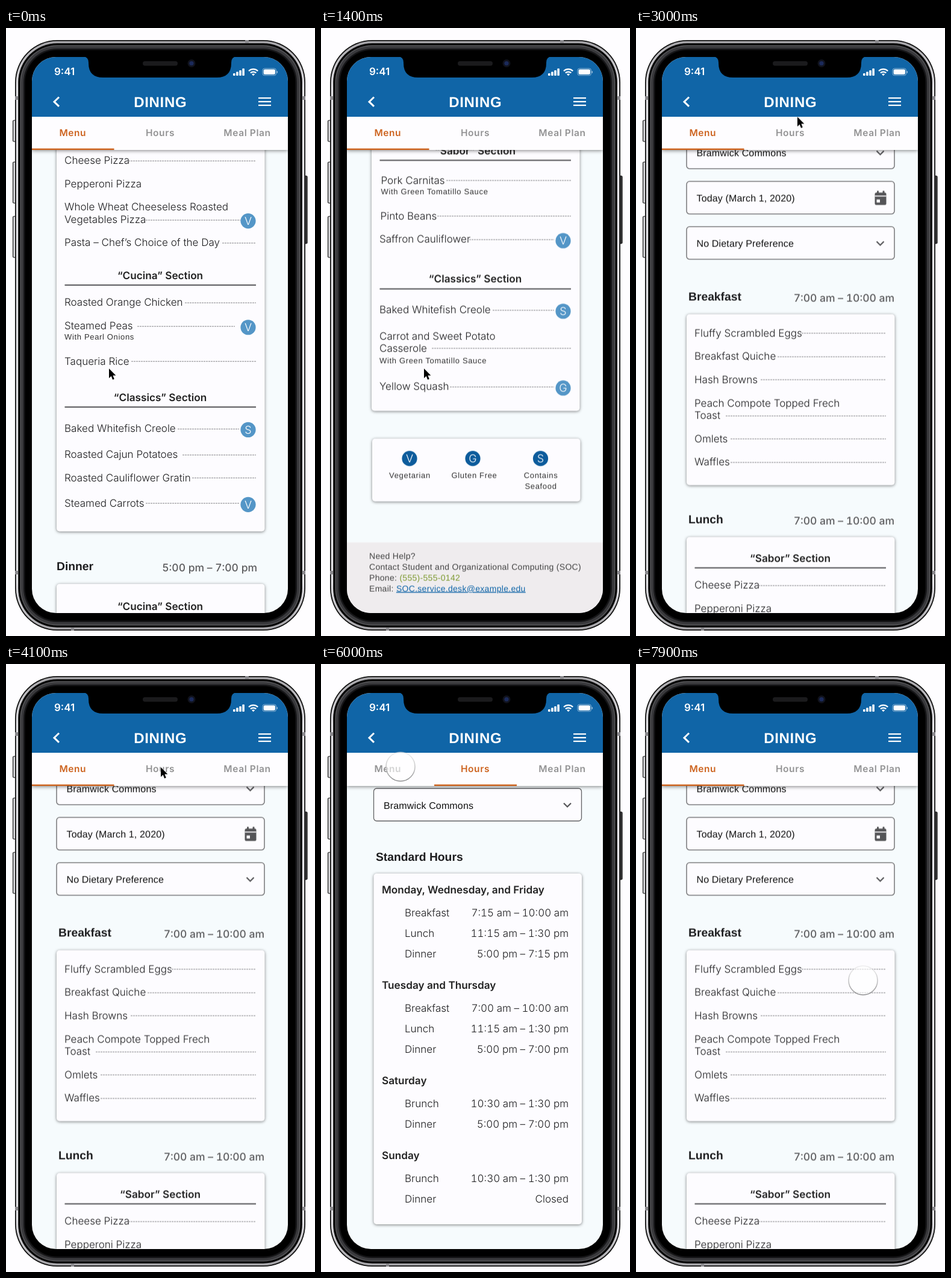
Animation of 513 by 1007 pixels, one loop 8 s. Source, as an HTML page:

```html
<!DOCTYPE html>
<html lang="en">
<head>
<meta charset="utf-8">
<title>Dining menu</title>
<style>
html, body { margin: 0; width: 100%; height: 100%; overflow: hidden; background: #fefdff; }
svg { display: block; width: 513px; height: 1007px; }
text { font-family: Inter, "Open Sans", sans-serif; text-rendering: geometricPrecision; white-space: pre; }
.item { font-weight: 300; font-size: 17.05px; fill: #1d1d1f; }
.sub { font: 13px "Liberation Sans", Arial, sans-serif; letter-spacing: .66px; fill: #333; }
.sec { font-weight: 600; font-size: 17.2px; fill: #222; }
.head { font: bold 19.3px "Liberation Sans", Arial, sans-serif; fill: #1d1d1f; }
.time { font-weight: 500; font-size: 17.5px; fill: #5c5c5e; }
.field { font: 16px "Liberation Sans", Arial, sans-serif; letter-spacing: .15px; fill: #111; }
.foot { font: 14px "Liberation Sans", Arial, sans-serif; letter-spacing: .3px; fill: #444; }
.mark { font-weight: 300; font-size: 18px; fill: #fff; }
.title { font: bold 24px "Liberation Sans", Arial, sans-serif; letter-spacing: .7px; fill: #fff; }
.clock { font-weight: 600; font-size: 17px; fill: #fff; }
.tab { font-weight: 600; font-size: 15.5px; letter-spacing: .6px; fill: #939394; }
.end { text-anchor: end; font-variant-numeric: tabular-nums; }
.mid { text-anchor: middle; }
.card { fill: #fdfcff; filter: drop-shadow(0 1px 2.5px rgba(0,0,0,.5)); }
.box { fill: #fdfcff; stroke: #626264; stroke-width: 1.3; }
.lead { stroke: #858587; stroke-dasharray: 3 1; }
.rule { stroke: #555558; stroke-width: 2; }
.icon { fill: none; stroke: #555558; stroke-width: 2.2; }

.anim { animation: 8s linear infinite; }
#menuX { animation-name: menuX; }
#menuY { animation-name: menuY; }
#hoursX { animation-name: hoursX; }
#hoursY { animation-name: hoursY; }
#menuTab { animation-name: menuTab; }
#hoursTab { animation-name: hoursTab; }
#menuBar { animation-name: menuBar; transform-origin: 43px 0; }
#hoursBar { animation-name: hoursBar; transform-origin: 188px 0; }
#arrow { animation-name: arrow, early; }
#touch { animation-name: touch, late; }

@keyframes menuY {
  0% { transform: translateY(-702px); animation-timing-function: cubic-bezier(.3,.4,.5,1); }
  12%, 21.25% { transform: translateY(-1661px); animation-timing-function: cubic-bezier(.4,0,.7,.75); }
  31.25% { transform: translateY(-508px); animation-timing-function: cubic-bezier(.3,.35,.5,1); }
  36.5%, 100% { transform: translateY(0); }
}
@keyframes menuX {
  0%, 56.72% { transform: translateX(0); animation-timing-function: ease-out; }
  62.97%, 78.1% { transform: translateX(-425px); animation-timing-function: ease-out; }
  84.35%, 100% { transform: translateX(0); }
}
@keyframes hoursX {
  0%, 56.72% { transform: translateX(425px); animation-timing-function: ease-out; }
  62.97%, 78.1% { transform: translateX(0); animation-timing-function: ease-out; }
  84.35%, 100% { transform: translateX(425px); }
}
@keyframes hoursY {
  0%, 65% { transform: translateY(-27px); animation-timing-function: ease-in-out; }
  70%, 100% { transform: translateY(0); }
}
@keyframes menuTab {
  0%, 56.72% { fill: #cd6420; animation-timing-function: ease-out; }
  62.97%, 78.1% { fill: #939394; animation-timing-function: ease-out; }
  84.35%, 100% { fill: #cd6420; }
}
@keyframes hoursTab {
  0%, 56.72% { fill: #939394; animation-timing-function: ease-out; }
  62.97%, 78.1% { fill: #cd6420; animation-timing-function: ease-out; }
  84.35%, 100% { fill: #939394; }
}
@keyframes menuBar {
  0%, 56.72% { opacity: 1; transform: none; }
  60%, 78.1% { opacity: 0; transform: none; }
  78.11% { opacity: 0; transform: scaleX(0); animation-timing-function: ease-out; }
  84.35%, 100% { opacity: 1; transform: scaleX(1); }
}
@keyframes hoursBar {
  0%, 56.72% { opacity: 0; transform: scaleX(0); animation-timing-function: ease-out; }
  62.97%, 78.1% { opacity: 1; transform: scaleX(1); }
  81.4%, 100% { opacity: 0; transform: scaleX(1); }
}
@keyframes arrow {
  0%, 30% { transform: translate(171px,564px); }
  31.25% { transform: translate(174px,532px); }
  37.5% { transform: translate(268px,147px); animation-timing-function: ease-out; }
  41.25%, 100% { transform: translate(257px,171px); }
}
@keyframes touch {
  0%, 66% { transform: translate(257px,177px); animation-timing-function: ease-in-out; }
  74%, 86% { transform: translate(132px,170px); animation-timing-function: cubic-bezier(.4,0,.7,.9); }
  98.75%, 100% { transform: translate(377px,524px); }
}
@keyframes early { 0%, 54.99% { opacity: 1; } 55%, 100% { opacity: 0; } }
@keyframes late { 0%, 54.99% { opacity: 0; } 55%, 100% { opacity: 1; } }
</style>
</head>
<body>
<svg id="stage" viewBox="0 0 513 1007" xmlns="http://www.w3.org/2000/svg"></svg>
<script>
const text = (x, y, str, cls, extra = '') =>
  `<text x="${x}" y="${y}" class="${cls}" ${extra}>${str}</text>`;
const rect = (x, y, w, h, r, attrs) =>
  `<rect x="${x}" y="${y}" width="${w}" height="${h}" rx="${r}" ${attrs}/>`;
const line = (x1, x2, y, cls) => `<path class="${cls}" d="M${x1} ${y}H${x2}"/>`;
const group = (id, body) => `<g id="${id}" class="anim">${body}</g>`;

const card = (x, top, bottom) => rect(x, top, 345.5, bottom - top, 5, 'class="card"');
const badge = (x, y, letter, color = '#5496c7') =>
  `<circle cx="${x}" cy="${y}" r="12.6" fill="${color}"/>` + text(x, y + 6.5, letter, 'mark mid');
const sub = (y, str, x = 97) => text(x, y + 4.5, str, 'sub');
const section = (y, name) =>
  text(256, y + 6, `“${name}” Section`, 'sec mid') + line(97.5, 415, Math.round(y + 15.7), 'rule');

// A dish, the start of its dotted leader and an optional diet letter.
function dish(y, name, lead, letter, x = 97, leadEnd = letter ? 387 : 415) {
  return text(x, y + 5.7, name, 'item')
    + (lead ? line(lead, leadEnd, Math.round(y) + .5, 'lead') : '')
    + (letter ? badge(402, y + 2.3, letter) : '');
}
const meal = (x, y, name, right, hours) =>
  text(x, y + 6.5, name, 'head') + text(right, y + 8.7, hours, 'time end');

const chevron = (x, y) => `<path class="icon" d="M${x - 6} ${y - 3.5}l6 6 6-6"/>`;
const field = (x, y, str, icon) =>
  rect(x, y - 28, 345, 54, 5, 'class="box"') + text(x + 16.5, y + 5.5, str, 'field') + (icon || chevron(x + 321.5, y));
const calendar = rect(396.5, 272.5, 19, 20.5, 2.5, 'fill="#555558"')
  + rect(400, 269.5, 3, 5, 1, 'fill="#555558"') + rect(409.5, 269.5, 3, 5, 1, 'fill="#555558"')
  + rect(396.5, 277.5, 19, 1.6, 0, 'fill="#fdfcff"') + rect(399.5, 284, 5.5, 5, 0, 'fill="#fdfcff"');

const cucina = y => section(y, 'Cucina')
  + dish(y + 44.5, 'Roasted Orange Chicken', 297)
  + dish(y + 83.5, 'Steamed Peas', 218, 'V', 97, 380)
  + sub(y + 101.5, 'With Pearl Onions')
  + dish(y + 142, 'Taqueria Rice', 208);
const classics = y => section(y, 'Classics') + dish(y + 51, 'Baked Whitefish Creole', 285, 'S');

const place = 'Bramwick Commons';
const navy = '#0d5c9c';

const menu = field(84, 207, place)
  + field(84, 282, 'Today (March 1, 2020)', calendar)
  + field(84, 357, 'No Dietary Preference')
  + meal(87, 445, 'Breakfast', 429, '7:00 am – 10:00 am')
  + card(84, 474, 757)
  + dish(505.4, 'Fluffy Scrambled Eggs', 275)
  + dish(544, 'Breakfast Quiche', 235)
  + dish(582.4, 'Hash Browns', 207)
  + dish(621.4, 'Peach Compote Topped Frech')
  + dish(642, 'Toast', 149)
  + dish(680.4, 'Omlets', 157)
  + dish(719, 'Waffles', 157)

  + meal(87, 814, 'Lunch', 429, '7:00 am – 10:00 am')
  + card(84, 843, 1537)
  + section(878, 'Sabor')
  + dish(923, 'Cheese Pizza', 203)
  + dish(961.4, 'Pepperoni Pizza')
  + dish(1000, 'Whole Wheat Cheeseless Roasted')
  + dish(1020.6, 'Vegetables Pizza', 232, 'V', 97, 389)
  + dish(1059, 'Pasta – Chef’s Choice of the Day', 359)
  + cucina(1113.3)
  + classics(1315.5)
  + dish(1410, 'Roasted Cajun Potatoes', 293)
  + dish(1448.4, 'Roasted Cauliflower Gratin', 309)
  + dish(1490.4, 'Steamed Carrots', 232, 'V')

  + meal(84, 1595, 'Dinner', 417, '5:00 pm – 7:00 pm')
  + card(84, 1624, 2295)
  + cucina(1661)
  + section(1864, 'Sabor')
  + dish(1913.4, 'Pork Carnitas', 208, '', 99.5)
  + sub(1932, 'With Green Tomatillo Sauce', 99.5)
  + dish(1972.4, 'Pinto Beans', 193, '', 98.5)
  + dish(2011, 'Saffron Cauliflower', 246, 'V')
  + classics(2076.8)
  + dish(2171.4, 'Carrot and Sweet Potato')
  + dish(2191.4, 'Casserole', 184)
  + sub(2211.5, 'With Green Tomatillo Sauce')
  + dish(2255, 'Yellow Squash', 214, 'G')

  + card(85, 2341, 2445)
  + badge(147, 2374, 'V', navy) + text(147.5, 2406, 'Vegetarian', 'sub mid')
  + badge(252, 2374, 'G', navy) + text(254.5, 2406, 'Gluten Free', 'sub mid')
  + badge(364.5, 2374, 'S', navy) + text(365, 2406, 'Contains', 'sub mid') + text(365, 2424, 'Seafood', 'sub mid')
  + rect(43, 2513, 425, 140, 0, 'fill="#efecee"')
  + text(80, 2540, 'Need Help?', 'foot')
  + text(80, 2558, 'Contact Student and Organizational Computing (SOC)', 'foot')
  + text(80, 2576, 'Phone: <tspan fill="#7d9a30">(555)-555-0142</tspan>', 'foot')
  + text(80, 2594, 'Email: <tspan fill="#0f65a8" text-decoration="underline">SOC.service.desk@example.edu</tspan>', 'foot');

// Each day: heading position, name, then [meal, hours] rows.
const days = [
  [374, 'Monday, Wednesday, and Friday', ['Breakfast', '7:15 am – 10:00 am'], ['Lunch', '11:15 am – 1:30 pm'], ['Dinner', '5:00 pm – 7:15 pm']],
  [532, 'Tuesday and Thursday', ['Breakfast', '7:00 am – 10:00 am'], ['Lunch', '11:15 am – 1:30 pm'], ['Dinner', '5:00 pm – 7:00 pm']],
  [690, 'Saturday', ['Brunch', '10:30 am – 1:30 pm'], ['Dinner', '5:00 pm – 7:00 pm']],
  [814, 'Sunday', ['Brunch', '10:30 am – 1:30 pm'], ['Dinner', 'Closed']]
];
const hours = field(87.5, 234, place)
  + text(91, 326, 'Standard Hours', 'head')
  + card(87.5, 347, 928)
  + days.map(([y, name, ...rows]) => text(101, y + 6.3, name, 'sec')
    + rows.map(([label, span], i) => {
      const base = y + 44 + i * 34;
      return text(139, base, label, 'item') + text(411, base, span, 'item end');
    }).join('')).join('')
  + text(88, 995.5, 'Upcoming Holiday Hours', 'head');

const bars = [4, 6.5, 9, 12].map((h, i) => rect(377 + i * 5.1, 79 - h, 3.6, h, 1, 'fill="#fff"')).join('');
const wifi = `<g fill="none" stroke="#fff" stroke-width="2.2">
  <path d="M403 71.2a11 11 0 0 1 15.2 0"/><path d="M405.9 74.4a7 7 0 0 1 9.4 0"/></g>
  <path fill="#fff" d="M408 76.6a4 4 0 0 1 5.2 0l-2.6 2.7z"/>`;
const battery = rect(426, 67, 22.5, 11.6, 3.2, 'fill="none" stroke="#fff" stroke-opacity=".5"')
  + rect(427.6, 68.6, 19.3, 8.4, 2, 'fill="#fff"') + rect(449.6, 71, 1.4, 4, .7, 'fill="#fff" opacity=".6"');

const header = rect(43, 147, 425, 55, 0, 'fill="#fefdff" style="filter:drop-shadow(0 1px 3px rgba(0,0,0,.5))"')
  + rect(43, 48, 425, 99, 0, 'fill="#1065a7"')
  + text(80, 78, '9:41', 'clock') + bars + wifi + battery
  + '<path d="M88 114.5l-8 7.7 8 7.7" fill="none" stroke="#fff" stroke-width="3"/>'
  + [116, 122, 128].map(y => rect(419, y - 1.1, 21, 2.2, 0, 'fill="#fff"')).join('')
  + text(256.3, 131, 'DINING', 'title mid')
  + text(110.8, 179, 'Menu', 'tab mid anim', 'id="menuTab"')
  + text(256, 179, 'Hours', 'tab mid anim', 'id="hoursTab"')
  + text(400.5, 179, 'Meal Plan', 'tab mid')
  + group('menuBar', rect(43, 199.5, 136.5, 2.5, 0, 'fill="#cd6420"'))
  + group('hoursBar', rect(188, 199.5, 137, 2.5, 0, 'fill="#cd6420"'));

const shell = (inset, fill) =>
  rect(15 + inset, 20 + inset, 482 - 2 * inset, 978 - 2 * inset, 70 - inset, `fill="${fill}"`);
const button = (x, y, h, fill) => rect(x, y, 5, h, 1.5, `fill="${fill}" stroke="#111" stroke-width="1.2"`);
const seam = (x, y, w, h) => rect(x, y, w, h, 0, 'fill="#8b8a8e"');

const phone = button(11.6, 153, 35, '#dddce0') + button(11.6, 222, 68, '#dddce0')
  + button(11.6, 312, 68, '#dddce0') + button(495, 245, 112, '#39393b')
  + shell(0, '#111') + shell(1.8, 'url(#steel)') + shell(5.2, '#050505')
  + shell(8.5, '#58585b') + shell(10, '#39393c') + shell(14, '#161618') + shell(16.5, '#000')
  + seam(397, 20, 6, 5) + seam(108, 993, 5, 5)
  + [113, 899].map(y => seam(15, y, 5.2, 6) + seam(491.8, y, 5.2, 6)).join('');

const notch = `<path d="M128 47Q137 48 137 57V58Q137 82 161 82H350Q374 82 374 58V57Q374 48 383 47Z"/>`
  + rect(227, 55, 58, 7.5, 3.7, 'fill="#1b1b1d"')
  + '<circle cx="308" cy="58.5" r="6.5" fill="#11131d"/><circle cx="308" cy="58.5" r="3.6" fill="#1b2a5a"/>';

const pointer = group('arrow',
  '<path d="M0 0V16L3.7 12.6 6.1 18.4 8.8 17.3 6.4 11.6H11.4Z" stroke="#fff" stroke-width="1" paint-order="stroke"/>')
  + group('touch', '<circle r="24" fill="#fff" fill-opacity=".6" stroke="url(#rim)" stroke-width="1.6"/>');

document.getElementById('stage').innerHTML = `<defs>
  <clipPath id="screen">${rect(43, 48, 425, 921, 40, '')}</clipPath>
  <linearGradient id="steel" x2="0" y2="1">
    <stop offset="0" stop-color="#a5a4a8"/><stop offset=".08" stop-color="#e6e5e9"/>
    <stop offset=".92" stop-color="#e6e5e9"/><stop offset="1" stop-color="#a5a4a8"/>
  </linearGradient>
  <linearGradient id="rim" x2="0" y2="1">
    <stop offset="0" stop-color="#ddd" stop-opacity=".5"/><stop offset="1" stop-color="#8f8f91"/>
  </linearGradient></defs>`
  + phone
  + `<g clip-path="url(#screen)">${rect(43, 48, 425, 921, 0, 'fill="#f6fbfd"')}`
  + group('menuX', group('menuY', menu)) + group('hoursX', group('hoursY', hours))
  + header + '</g>' + notch + pointer;
</script>
</body>
</html>
```
